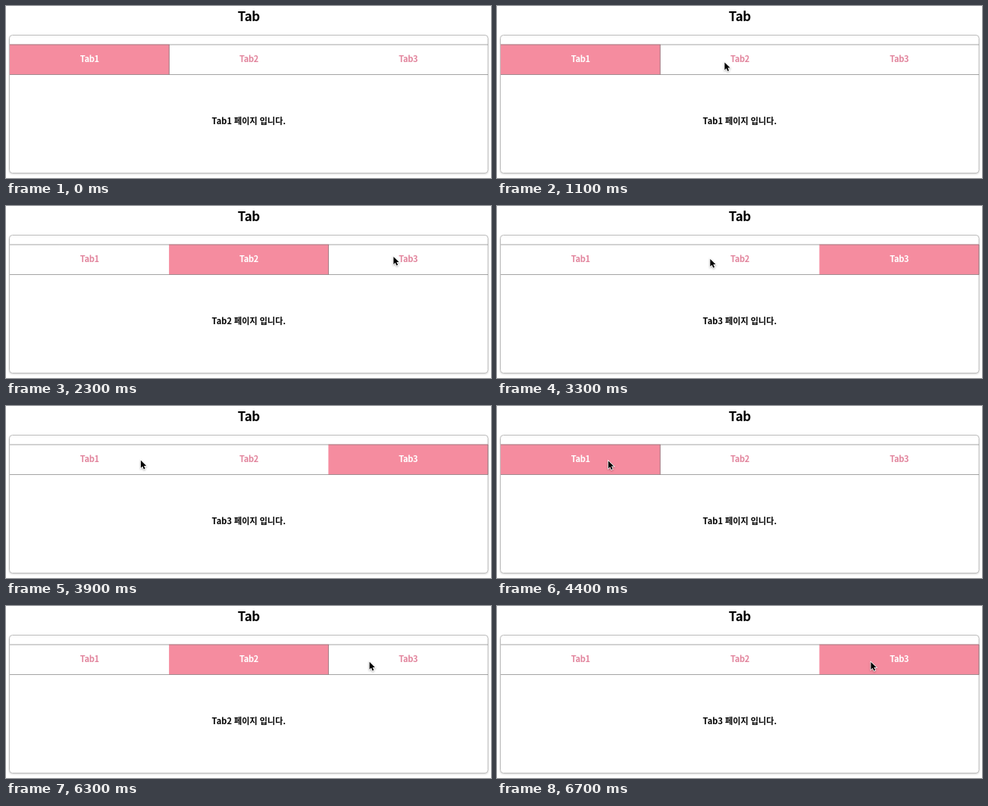
Recreate the animation shown at these times as an HTML page. Size 640 px wide and 227 px high, loop 7570 ms.

```html
<!DOCTYPE html>
<html lang="ko">
<head>
<meta charset="utf-8">
<title>Tab</title>
<style>
  html, body { margin: 0; width: 100%; height: 100%; overflow: hidden; background: #fff; }
  svg { display: block; width: 640px; height: 227px; }
  text {
    font: 700 11.1px "Noto Sans CJK KR", "Noto Sans CJK", "Noto Sans", sans-serif;
    text-anchor: middle;
  }
  .title { font-size: 17px; letter-spacing: -.02em; }
  .label { letter-spacing: -.03em; fill: #e2859d; }
  .label.on { fill: #fff; }
  .panel { fill: #fff; stroke: #bcbcbc; filter: drop-shadow(0 1px 1px rgba(0, 0, 0, .16)); }
  .rule { stroke: rgba(110, 110, 110, .62); }
  .cursor { filter: drop-shadow(0 1px 1px rgba(0, 0, 0, .3)); }
</style>
</head>
<body>
<svg viewBox="0 0 640 227">
  <text class="title" x="320.3" y="20">Tab</text>
  <rect class="panel" x="4.5" y="38.5" width="631.5" height="182" rx="4"/>
  <rect id="fill" y="50.6" width="210.8" height="40" fill="#f58c9f"/>
  <path class="rule" d="M5 51H636M5 90.5H636"/>
  <path class="rule" id="edge" d="M0 51V90.5"/>
  <g id="labels"></g>
  <text id="page" x="320.3" y="155.6"></text>
  <g id="cursor" class="cursor">
    <path d="M.4 .5V10.4L2.7 8.3L4.4 12.1L6.1 11.3L4.4 7.6H7.6Z"
      fill="#000" stroke="#fff" stroke-width="1.5" paint-order="stroke"/>
  </g>
</svg>
<script>
const LOOP = 7570, STEP = 100, TAB = 210.3, LEFT = 4.8;

// [time, active tab]
const clicks = [[0, 0], [1400, 1], [2500, 2], [4400, 0], [5300, 1], [6700, 2]];

// [start, end, x, y]: the pointer glides to each stop and rests there
const glides = [
  [400, 400, 119.5, 220.5],
  [800, 1100, 300, 74],
  [1700, 1800, 309.5, 66.5],
  [1900, 2300, 511, 66.5],
  [2900, 3700, 235.5, 70],
  [3700, 4300, 146.5, 72],
  [4600, 5000, 314, 66.5],
  [5200, 5300, 368.7, 71.5],
  [5900, 6600, 493, 73.5]
];

const el = id => document.getElementById(id);
const ease = p => 1 - (1 - p) ** 2.6;

el("labels").innerHTML = [0, 1, 2].map(i =>
  `<text class="label" x="${110.2 + TAB * i}" y="74">Tab${i + 1}</text>`).join("");

function pointerAt(t) {
  let pos = null;
  for (const [start, end, x, y] of glides) {
    if (t < start) break;
    if (!pos || t >= end) { pos = [x, y]; continue; }
    const p = ease((t - start) / (end - start));
    pos = [pos[0] + (x - pos[0]) * p, pos[1] + (y - pos[1]) * p];
  }
  return pos;
}

function showTab(n) {
  const left = LEFT + TAB * n;
  el("fill").setAttribute("x", left);
  el("edge").setAttribute("transform", `translate(${left + TAB + .2})`);
  [...el("labels").children].forEach((label, i) => label.classList.toggle("on", i === n));
  el("page").textContent = `Tab${n + 1} 페이지 입니다.`;
}

function draw(now) {
  const t = Math.floor(now % LOOP / STEP) * STEP;
  showTab(clicks.filter(c => c[0] <= t).pop()[1]);
  const pos = pointerAt(t);
  el("cursor").style.visibility = pos ? "visible" : "hidden";
  if (pos) el("cursor").setAttribute("transform", `translate(${pos})`);
}

const start = performance.now();
function tick() {
  draw(performance.now() - start);
  requestAnimationFrame(tick);
}
tick();
</script>
</body>
</html>
```
